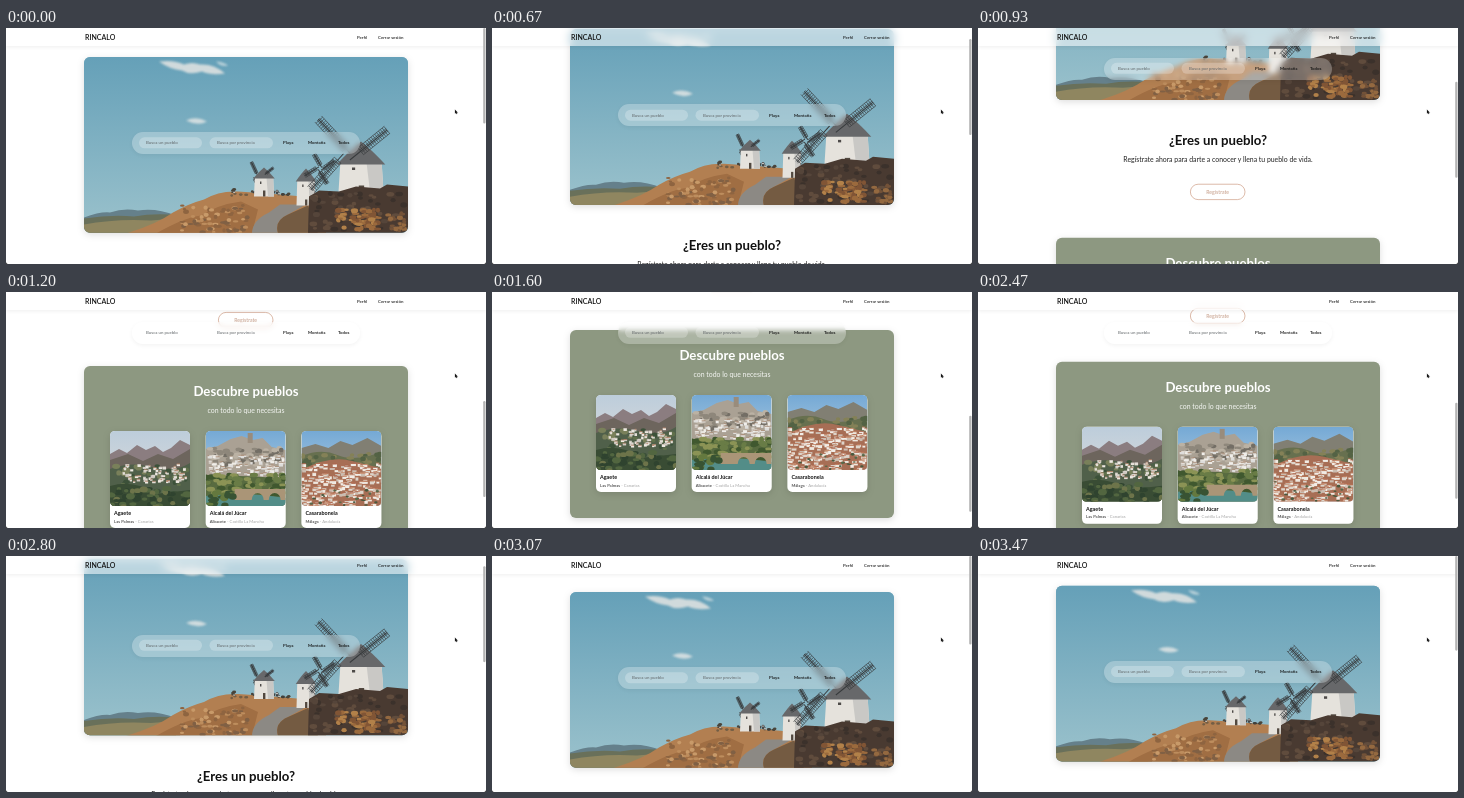
These frames come from a looping animation (480x236 px, 3540 ms). An HTML page:

```html
<!DOCTYPE html>
<html lang="es">
<head>
<meta charset="utf-8">
<title>Pueblos</title>
<style>
html, body { margin: 0; width: 100%; height: 100%; overflow: hidden; background: #fff; }
svg, .glass { position: absolute; left: 0; top: 0; }
svg { width: 480px; height: 236px; font-family: Lato, "Open Sans", sans-serif; }
#header { width: 480px; height: 18px; background: rgba(255,255,255,.55);
  backdrop-filter: blur(4px); box-shadow: 0 1px 4px rgba(0,0,0,.07); }
#bar { left: 126px; width: 228px; height: 21.5px; border-radius: 11px;
  background: rgba(255,255,255,.27); backdrop-filter: blur(2.5px);
  box-shadow: 0 1.5px 4px rgba(0,0,0,.05); }
.title { font-size: 13.2px; font-weight: 700; text-anchor: middle; }
.lead { font-size: 6.9px; text-anchor: middle; }
.small { font-size: 4.4px; }
.strong { font-weight: 600; }
</style>
</head>
<body>
<svg id="page" viewBox="0 0 480 236"></svg>
<div id="bar" class="glass"></div>
<div id="header" class="glass"></div>
<svg id="top" viewBox="0 0 480 236"></svg>
<script>
const LOOP = 3540, STEP = 200 / 3;
const BAR_Y = 103.5, BAR_STICK = 29.5, THUMB = 96, RATIO = 0.407;

// Scroll offset over time: [ms, px]
const SCROLL = [
  [0, -.5], [200, 0], [340, 0], [470, 4], [600, 15], [730, 43], [800, 66], [933, 132],
  [1067, 212], [1200, 268], [1333, 289], [1467, 299], [1600, 304], [1930, 308],
  [2270, 308], [2333, 304], [2400, 293], [2467, 272], [2600, 180], [2733, 68],
  [2800, 25], [2867, -4], [2940, -9], [3067, -7.5], [3200, -4.5], [3333, -2.3],
  [3467, -1.3], [3540, -.5]
];

let seed = 7;
const rand = () => (seed = seed * 16807 % 2147483647) / 2147483647;
const between = (a, b) => a + rand() * (b - a);
const pick = list => list[Math.floor(rand() * list.length)];
const rect = (x, y, w, h, fill, more = '') =>
  `<rect x="${x}" y="${y}" width="${w}" height="${h}" fill="${fill}" ${more}/>`;
const path = (d, fill, more = '') => `<path d="${d}" fill="${fill}" ${more}/>`;
const oval = (x, y, rx, ry, fill, more = '') =>
  `<ellipse cx="${x}" cy="${y}" rx="${rx}" ry="${ry}" fill="${fill}" ${more}/>`;
const text = (x, y, str, cls, fill, more = '') =>
  `<text x="${x}" y="${y}" class="${cls}" fill="${fill}" ${more}>${str}</text>`;
const repeat = (n, fn) => Array.from({ length: n }, (_, i) => fn(i)).join('');
const fade = (id, a, b) => `<linearGradient id="${id}" x2="0" y2="1">
  <stop stop-color="${a}"/><stop offset="1" stop-color="${b}"/></linearGradient>`;

function blobs(n, x, y, w, h, size, colors) {
  return repeat(n, () => oval(between(x, x + w), between(y, y + h),
    between(size * .5, size), between(size * .3, size * .7), pick(colors)));
}

function houses(n, x, y, w, h, size, walls, roofs) {
  const spots = Array.from({ length: n }, () => [between(x, x + w), between(y, y + h)]);
  return spots.sort((a, b) => a[1] - b[1]).map(([hx, hy]) => {
    const hw = between(size * .7, size * 1.5), hh = between(size * .5, size);
    return rect(hx, hy, hw, hh, pick(walls)) + rect(hx, hy - .5, hw, .8, pick(roofs));
  }).join('');
}

// Lattice sail pointing right from the hub, then rotated
function sail(x, y, angle, from, len, width) {
  const bars = repeat(Math.floor((len - from) / 2.4) + 1, i => `M${from + i * 2.4} 0v${width}`);
  const rails = [0, .33, .67, 1].map(k => `M${from} ${k * width}H${len}`).join('');
  return `<g transform="translate(${x} ${y}) rotate(${angle})" fill="none" stroke="#383b3d">
    <path d="M0 ${width / 2}H${len}" stroke-width="1"/>
    <path d="${bars}${rails}" stroke-width=".6"/></g>`;
}

function mill(x, y, w, h, roof) {
  const r = w / 2;
  return path(`M${x - r * .92} ${y - h}H${x + r * .92}L${x + r} ${y}H${x - r}Z`, '#e5e2dc') +
    path(`M${x + r * .25} ${y - h}H${x + r * .92}L${x + r} ${y}H${x + r * .4}Z`, '#c9c8c5') +
    path(`M${x - r * 1.08} ${y - h + 1}Q${x - r * .5} ${y - h - roof * .6} ${x} ${y - h - roof}
      Q${x + r * .5} ${y - h - roof * .6} ${x + r * 1.08} ${y - h + 1}Z`, '#67686a') +
    rect(x - r * .4, y - h + 4, w * .07, 2.5, '#4d4a48') +
    rect(x - r * .1, y - 6, w * .12, 6, '#51483f');
}

function hero() {
  return `<g clip-path="url(#heroClip)">` +
    rect(78, 28, 324, 177, 'url(#sky)') +
    `<g filter="url(#soft)" opacity=".85">` +
    path('M153 33Q168 31 178 36Q186 33 194 36Q208 35 219 45Q205 47 196 43Q184 47 176 42Q164 41 153 33Z', '#e3e4e2') +
    path('M180 92Q190 87 201 93Q192 98 180 92Z', '#dfe4e4') +
    path('M210 33Q217 33 222 37Q215 39 210 33Z', '#c5d8de') + '</g>' +
    path('M78 189Q94 183 104 184Q118 179 132 182Q150 179 170 187V198H78Z', '#65808b') +
    path('M78 190Q105 186 128 188Q150 184 174 187V205H78Z', '#69705a') +
    path('M78 196Q110 190 145 192L170 190V205H78Z', '#8f8660') +
    path('M120 205Q150 196 167 184Q183 175 198 171Q213 162 232 163L262 165L320 170V205Z', '#b27f51') +
    path('M150 205Q178 189 195 187Q212 176 235 173L252 181L246 205Z', '#a06e43') +
    blobs(75, 176, 177, 66, 27, 3.2, ['#8e6440', '#bd8d5d', '#c89a69', '#806044']) +
    path('M246 205Q246 192 263 184L274 176H300L282 186Q268 192 272 205Z', '#8c8984') +
    path('M272 205Q268 192 282 186L302 177L312 205Z', '#745b42') +
    blobs(20, 225, 161, 60, 6, 2.2, ['#49443a', '#735e45', '#403f3b']) +
    houses(7, 226, 161, 54, 4, 2, ['#d8d5cf', '#3e4244', '#a6a5a2'], ['#565657']) +
    sail(250, 147, -115, 2, 14, 3) + sail(249, 148, 60, 2, 13, 3) +
    mill(258, 168, 20, 19, 10) +
    sail(258, 145, -38, 2, 11, 2.5) +
    mill(300, 177, 19, 25, 12) +
    sail(314, 140, -120, 3, 15, 4) + sail(314, 140, -35, 3, 16, 4) +
    sail(314, 140, 58, 3, 17, 4) + sail(314, 140, 148, 3, 17, 4) +
    mill(355, 163, 45, 28, 22) +
    sail(341, 128, -133, 7, 47, 9) + sail(341, 128, -39, 14, 48, 9) +
    sail(341, 128, 132, 9, 49, 9) +
    path('M303 168L313 162L333 163L350 158L374 160L381 156L402 158V205H302Z', '#493a31') +
    blobs(65, 306, 165, 94, 37, 4, ['#55453a', '#3b312b', '#604c3d']) +
    blobs(65, 332, 181, 42, 20, 3.8, ['#9b6a3d', '#b28149', '#815535']) +
    blobs(24, 382, 184, 20, 18, 3.2, ['#946940', '#735238']) + '</g>';
}

const scenes = [
  () => rect(0, 0, 80, 76, 'url(#haze)') +
    path('M0 23L9 18L17 22L27 14L36 19L45 15L53 21L61 17L70 9L80 14V55H0Z', '#8b7d80') +
    path('M0 29L18 23L33 30L48 23L63 28L80 18V60H0Z', '#6d655d') +
    path('M0 38Q20 30 42 36T80 32V76H0Z', '#50604a') +
    blobs(55, 0, 35, 80, 38, 4, ['#3c5139', '#60704b', '#79805a']) +
    houses(70, 8, 33, 68, 18, 2.6, ['#e4dfd8', '#cfc9c2', '#eee9e2'], ['#b48367', '#ddd7d0']) +
    path('M0 55Q25 48 45 63L80 59V76H0Z', '#394c34') +
    blobs(50, 0, 56, 80, 20, 4.5, ['#2f432f', '#526640', '#6d744a']),
  () => rect(0, 0, 80, 76, 'url(#clear)') +
    path('M0 18L12 15L25 8L36 5L47 9L57 7L66 16L80 19V58H0Z', '#aaa194') +
    blobs(60, 4, 17, 72, 18, 4, ['#8e877b', '#bbb2a4', '#736e65']) +
    rect(42, 2, 5, 10, '#998c7c') +
    houses(100, 0, 24, 78, 22, 3.2, ['#f0eeea', '#dedddb', '#cfc9c1'], ['#a78a74', '#eeeae4']) +
    path('M0 48Q24 42 80 48V76H0Z', '#586b40') +
    blobs(75, 0, 44, 80, 19, 4.5, ['#40582f', '#697c46', '#8b9355']) +
    path('M0 65Q36 60 80 67V76H0Z', '#538d88') +
    path('M29 58H80V69H75A6 7 0 0 0 63 69H58A6 7 0 0 0 46 69H29Z', '#aa9577') +
    blobs(18, 0, 61, 28, 14, 5, ['#385333', '#64793f']),
  () => rect(0, 0, 80, 76, 'url(#clear)') +
    path('M0 17L14 13L27 17L39 10L51 14L66 7L80 15V48H0Z', '#817f73') +
    path('M0 25Q20 17 36 24T80 21V55H0Z', '#67704f') +
    blobs(35, 0, 22, 80, 14, 4, ['#536244', '#848157']) +
    path('M0 39Q28 24 51 30T80 37V76H0Z', '#a76e55') +
    houses(240, -2, 32, 82, 43, 3.7, ['#eee8df', '#ddd4ca', '#cbbdb1', '#f1ece6'], ['#b76d4d', '#a96148', '#c88b6c']) +
    blobs(24, 0, 52, 80, 23, 2, ['#58694a', '#48583d'])
];

const CARDS = [
  ['Agaete', 'Las Palmas', 'Canarias'],
  ['Alcalá del Júcar', 'Albacete', 'Castilla La Mancha'],
  ['Casarabonela', 'Málaga', 'Andalucía']
];

function card([name, province, region], i) {
  return `<g transform="translate(${104 + i * 95.7} 407)">` +
    rect(0, 0, 80, 97, '#fff', 'rx="5" filter="url(#shade)"') +
    `<g clip-path="url(#photoClip)">${scenes[i]()}</g>` +
    text(4, 84.3, name, '', '#151515', 'font-size="5.4" font-weight="700"') +
    `<text x="4" y="91.6" font-size="4.2" fill="#a5a5a5"><tspan fill="#333" font-weight="500">${province}</tspan> - ${region}</text></g>`;
}

function pageMarkup() {
  return `<defs>${fade('sky', '#65a0b8', '#9bc2cc')}${fade('haze', '#bdcddb', '#e3dfda')}
    ${fade('clear', '#75a9d5', '#c8dbe6')}
    <clipPath id="heroClip"><rect x="78" y="28.5" width="324" height="175.7" rx="6"/></clipPath>
    <clipPath id="photoClip"><path d="M5 0H75Q80 0 80 5V70Q80 75 75 75H5Q0 75 0 70V5Q0 0 5 0Z"/></clipPath>
    <filter id="soft"><feGaussianBlur stdDeviation=".9"/></filter>
    <filter id="shade" x="-20%" y="-20%" width="140%" height="140%">
      <feDropShadow dx="0" dy="2" stdDeviation="3.5" flood-opacity=".13"/></filter></defs>
    <g id="scroll">` +
    rect(78, 28.5, 324, 175.7, '#85b2c2', 'rx="6" filter="url(#shade)"') + hero() +
    text(240, 249.5, '¿Eres un pueblo?', 'title', '#111') +
    text(240, 266, 'Regístrate ahora para darte a conocer y llena tu pueblo de vida.', 'lead', '#222') +
    rect(212.4, 288.4, 54.6, 15.4, '#fff', 'rx="7.7" stroke="#d3a994" stroke-width=".8"') +
    text(239.7, 298, 'Regístrate', '', '#c49b86', 'font-size="5.2" text-anchor="middle"') +
    rect(78, 342, 324, 188, '#8d9881', 'rx="6" filter="url(#shade)"') +
    text(240, 371.7, 'Descubre pueblos', 'title', '#fff') +
    text(240, 388.7, 'con todo lo que necesitas', 'lead', '#f5f6f3') +
    CARDS.map(card).join('') + '</g>';
}

function topMarkup() {
  const field = (x, w) => rect(x, 5.3, w, 11, '#fff', 'rx="5.5" fill-opacity=".25"');
  return `<g id="search">` + field(133, 63) + field(203.5, 63.5) +
    text(140, 12.3, 'Busca un pueblo', 'small', '#606568') +
    text(211, 12.3, 'Busca por provincia', 'small', '#606568') +
    [[277, 'Playa'], [302, 'Montaña'], [332, 'Todos']]
      .map(([x, label]) => text(x, 12.3, label, 'small strong', '#111')).join('') + '</g>' +
    text(79, 11.7, 'RINCALO', 'strong', '#111', 'font-size="7"') +
    text(351, 10.7, 'Perfil', 'small', '#111', 'font-weight="500"') +
    text(372, 10.7, 'Cerrar sesión', 'small', '#111', 'font-weight="500"') +
    rect(477.2, 0, 2.3, THUMB, '#b4b4b4', 'id="thumb" rx="1.1"') +
    path('M449 81.7V85.5L449.9 84.7L450.6 86.1L451.2 85.8L450.6 84.5H451.7Z', '#111', 'stroke="#111" stroke-width=".2"') +
    path('M0 234V236H2Q0 236 0 234ZM480 234V236H478Q480 236 480 234Z', '#000');
}

// Monotone cubic interpolation through the scroll points
function scrollAt(t) {
  const n = SCROLL.length;
  const rise = i => (SCROLL[i + 1][1] - SCROLL[i][1]) / (SCROLL[i + 1][0] - SCROLL[i][0]);
  const slope = i => {
    if (i === 0 || i === n - 1) return 0;
    const a = rise(i - 1), b = rise(i);
    return a * b <= 0 ? 0 : 2 * a * b / (a + b);
  };
  let i = 0;
  while (i < n - 2 && t >= SCROLL[i + 1][0]) i++;
  const [t0, y0] = SCROLL[i], [t1, y1] = SCROLL[i + 1];
  const h = t1 - t0, u = (t - t0) / h, v = 1 - u;
  return y0 * (1 + 2 * u) * v * v + y1 * u * u * (3 - 2 * u) +
    h * u * v * (slope(i) * v - slope(i + 1) * u);
}

const el = id => document.getElementById(id);
el('page').innerHTML = pageMarkup();
el('top').innerHTML = topMarkup();
const content = el('scroll'), bar = el('bar'), search = el('search'), thumb = el('thumb');

function draw(time) {
  const step = Math.min(52, Math.floor((time % LOOP + 5) / STEP));
  const s = scrollAt(step * STEP);
  const y = Math.max(BAR_Y - s, BAR_STICK);
  content.setAttribute('transform', `translate(0 ${-s})`);
  bar.style.top = y + 'px';
  search.setAttribute('transform', `translate(0 ${y})`);
  thumb.setAttribute('y', Math.max(0, s * RATIO));
  thumb.setAttribute('height', THUMB + Math.min(0, s));
}

const start = performance.now();
function tick() {
  draw(performance.now() - start);
  requestAnimationFrame(tick);
}
tick();
</script>
</body>
</html>
```
